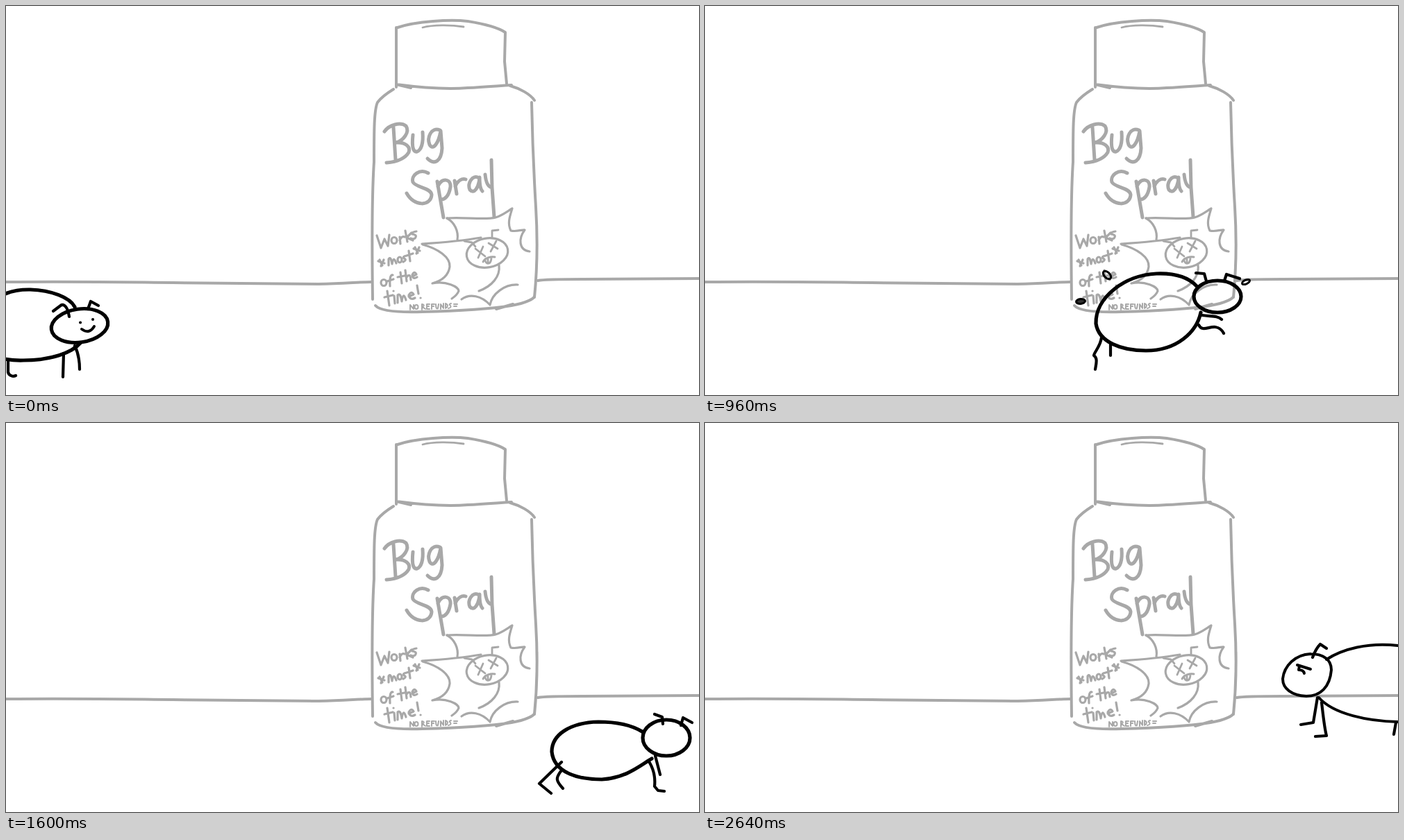
These frames come from a looping animation (998 px wide and 561 px high, 2890 ms). An HTML page:

```html
<!DOCTYPE html>
<html lang="en">
<head>
<meta charset="utf-8">
<title>Bug Spray</title>
<style>
html, body { margin: 0; width: 100%; height: 100%; overflow: hidden; background: #fff; }
svg { display: block; width: 100%; height: 100%; }
path, ellipse { fill: none; stroke-linecap: round; stroke-linejoin: round; }
#scene { stroke: #a8a8a8; stroke-width: 4; }
#bug, #drops { stroke: #000; stroke-width: 4.2; }
#drops { stroke-width: 3; }
.body { stroke-width: 5.2; }
.face, #angry .body { stroke-width: 4; }
.big { stroke-width: 5; }
.mid { stroke-width: 3.2; }
.thin { stroke-width: 2.8; }
.tiny { stroke-width: 2; }
</style>
</head>
<body>
<svg viewBox="0 0 998 561" role="img" aria-label="Bug Spray. Works *most* of the time! No refunds">
  <g id="scene"></g>
  <g id="bug"></g>
  <g id="drops"></g>
</svg>
<script>
const LOOP = 2890;
const $ = id => document.getElementById(id);
const line = (d, cls = '') => `<path class="${cls}" d="${d}"/>`;
const oval = (x, y, rx, ry, turn = 0, cls = '', fill = 'none') =>
  `<ellipse class="${cls}" cx="${x}" cy="${y}" rx="${rx}" ry="${ry}" transform="rotate(${turn} ${x} ${y})" style="fill:${fill}"/>`;

// Backdrop
const ground = line('M0 398C100 397 150 398 240 399S390 401 450 401C490 400 510 398 526 398M766 396C776 394 800 394 830 394L998 393');
const bottle = [
  'M562 31L562 117M564 31C590 22 640 19 665 22C690 26 710 32 719 38L718 80L721 112',
  'M562 113C600 118 640 120 665 118C690 117 710 115 728 114M562 113L583 118',
  'M558 120C545 128 538 135 535 139C530 150 530 180 530 225C527 270 527 350 528 423',
  'M726 115C740 119 755 127 761 136M757 139C758 190 760 240 763 290C766 340 764 390 761 420',
  'M532 432C540 441 570 442 600 441C640 440 690 438 728 432C750 428 760 422 761 419M706 437L730 430'
].map(d => line(d)).join('') + line('M600 31C615 27 640 27 659 30', 'thin');

const title = [
  'M545 181C552 171 568 167 576 173C582 182 572 194 562 197C575 196 583 203 580 211C574 221 560 225 548 226M558 175L561 222',
  'M586 186C584 205 587 211 592 210C599 207 601 195 600 182',
  'M625 179C612 174 606 190 610 200C615 209 623 198 626 180L628 205C627 224 617 230 607 220',
  'M608 241C596 234 583 244 586 254C590 262 612 262 613 272C612 289 588 290 577 270',
  'M621 253L630 305M622 260C628 247 641 249 640 261C638 274 632 279 627 279',
  'M646 252L649 271M647 260C650 252 657 248 662 250',
  'M681 248C672 242 664 256 668 265C674 272 681 262 682 247C682 259 683 264 686 267',
  'M690 243C691 254 694 261 700 262M699 222L700 262L703 304'
].map(d => line(d, 'big')).join('');

const star = (x, y) => `M${x - 5} ${y - 2}l9 3M${x + 3} ${y - 4}l-4 9M${x - 3} ${y - 4}l4 8`;
const slogan = [
  'M534 331L540 349L545 336L550 346L552 330',
  'M567 333L568 343M567 338Q570 331 574 333M575 324L578 340M584 327L577 334L586 338',
  'M591 325Q584 326 585 329Q593 330 589 335Q586 337 583 335',
  star(541, 370), star(592, 352),
  'M551 374L551 365Q554 360 556 372Q558 359 562 371',
  'M577 360Q571 361 573 364Q578 366 572 369M580 353L582 368M577 360L586 357',
  'M557 388Q552 387 553 404M549 397L558 394',
  'M568 384L570 400M564 391L574 389M575 381L577 397M577 391Q582 384 583 395',
  'M585 390L591 387Q588 381 585 388Q586 395 592 391',
  'M549 411L552 432M545 420L557 417M559 418L560 429M558 411h.1',
  'M564 428L564 417Q568 413 570 426Q572 411 576 424',
  'M580 419L587 416Q584 410 580 417Q582 425 589 421M592 403L594 415M597 421h.1'
].map(d => line(d, 'mid')).join('') +
  oval(559, 338, 4, 4.5, 0, 'mid') + oval(567, 366, 3, 4, 0, 'mid') + oval(544, 399, 4, 4.5, 0, 'mid');

const refunds = line('M582 438L582 431L587 437L587 431M599 438V430Q604 431 600 434L604 437M610 430H606V437H610M606 433H609M613 437V430H617M613 433H616', 'tiny') +
  line('M619 430Q619 438 622 436L623 430M626 437V430L630 436V429M633 436V429Q639 432 633 436M641 429Q637 430 640 432Q642 435 637 436M645 430H650M645 433H649', 'tiny') +
  oval(591, 434, 2.5, 3, 0, 'tiny');

const burst = [
  'M635 306C660 304 690 309 705 305C715 302 722 296 729 292C725 305 722 314 727 324C735 326 745 322 747 323C738 335 738 352 754 354',
  'M635 306C646 312 652 325 650 337M599 343C630 341 655 339 684 334',
  'M600 344C622 350 640 362 639 376C637 390 625 397 614 400C634 396 652 405 652 411C650 416 645 420 642 422',
  'M656 423C668 414 685 418 697 431C700 415 718 401 737 402'
].map(d => line(d, 'mid')).join('');
const victim = oval(693, 356, 30, 21, -10, 'mid') +
  line('M676 350L690 361M687 347L680 363M695 342L708 350M706 339L698 354', 'thin') +
  line('M700 334L700 324L709 323M660 339L671 341L676 347', 'thin') +
  line('M687 369C690 363 698 361 704 362M690 365C690 373 698 374 699 364M694 365V369', 'thin') +
  line('M710 374C712 390 700 404 681 411', 'mid');
$('scene').innerHTML = ground + bottle + title + slogan + refunds + burst + victim;

// Bug poses
const body = d => line(d, 'body');
const face = d => line(d, 'face');
const landed = body('M708 441C690 430 665 427 645 427C605 428 578 445 578 470C581 500 615 510 650 510C685 508 705 490 722 480') +
  oval(743, 450, 34, 26, 0, 'body') +
  line('M738 430L737 420L726 416M764 432L767 421L780 428');
const poses = {
  strideA: body('M99 434C92 420 65 410 35 409C-15 408-40 440-40 470C-40 500-10 512 25 511C65 511 95 500 107 486') +
    oval(106, 461, 41, 24, -8, 'body') +
    line('M91 448Q88 430 80 431L68 440M118 437L122 426L133 432') +
    line('M3 511L3 528C4 533 10 535 14 533M83 501L82 535M99 490C104 500 106 510 106 524M-26 500L-34 526L-24 534') +
    face('M109 466Q120 474 127 462M107 456.5h.1M125 452h.1'),
  strideB: body('M321 443C318 425 285 414 255 413C220 412 174 440 174 478C174 505 205 521 240 521C275 521 303 505 316 489') +
    oval(316, 466, 43, 21, -3, 'body') +
    line('M299 451L295 436L285 443M333 441L340 431L351 434') +
    line('M188 496C182 512 172 520 159 524L175 536M203 515C204 530 208 533 215 534M289 513C288 525 280 530 273 539M303 506C308 522 315 536 330 537') +
    face('M318 469Q332 478 340 463M323 459h.1M342 454.5h.1'),
  turn: body('M579 440C570 428 545 420 525 421C490 421 446 445 446 482C447 515 490 529 530 529C565 528 592 512 597 491') +
    body('M543 468C543 452 560 447 585 447C605 448 620 460 621 467C618 480 600 489 580 489C558 488 543 480 543 468') +
    line('M573 437L580 442L591 443L587 454M580 441L586 453') +
    line('M469 507C473 517 481 520 479 530C476 545 470 550 471 556L479 558M498 529L499 544Q504 548 514 548M575 510C585 520 592 530 599 542M597 492C600 508 610 519 622 523') +
    face('M601 460h.1'),
  leap: body('M708 404C695 390 675 385 650 386C605 388 562 420 563 458C567 485 600 497 635 497C680 497 708 470 714 442') +
    oval(738, 419, 34, 23, 0, 'body') +
    line('M722 397L719 386L707 385M748 396L751 387L770 393') +
    line('M571 478C570 490 560 500 560 504C566 508 563 517 562 524M584 488V504M716 446C728 448 738 446 744 452M711 460C716 470 725 462 735 463C742 464 745 468 747 472'),
  land: landed +
    line('M592 485L560 516L577 530M592 497C583 508 584 512 594 523M727 476L734 503M719 486C726 498 727 510 726 520L731 526L740 527'),
  step: landed +
    line('M594 488L584 508L588 527L597 529M606 503L592 520L600 527M731 476L742 504M714 488C712 500 708 512 704 524L714 526'),
  angry: body('M895 341C918 326 955 316 998 321C1050 326 1080 350 1080 376C1080 420 1040 432 998 431C955 430 905 420 884 396') +
    body('M872 333C890 333 902 341 902 356C900 381 886 394 866 394C845 393 832 383 832 369C834 350 850 334 872 333') +
    line('M875 338C878 330 882 323 886 319L895 325M882 396L876 432L858 435M888 403C890 420 892 440 895 451L879 452M995 432L992 449') +
    face('M853 349L872 355M856 350L855 356Q862 356 863 361')
};
$('bug').innerHTML = Object.entries(poses).map(([name, art]) => `<g id="${name}">${art}</g>`).join('');

// [start, pose, dx, dy]
const shots = [
  [0, 'strideA', 0, 0], [120, 'strideA', 79, 1], [160, 'strideB', -105, -2], [280, 'strideA', 184, 4],
  [320, 'strideB', 0, 0], [440, 'strideA', 309, 6], [480, 'strideB', 132, 4], [600, 'strideA', 442, 9],
  [640, 'turn', 0, 0], [760, 'turn', 90, 2], [800, 'land', -8, 20],
  [960, 'leap', 0, 0], [1040, 'leap', 2, -20], [1120, 'leap', 3, -8], [1200, 'leap', 4, 20],
  [1280, 'land', 0, 0], [1400, 'step', 70, -3], [1440, 'land', 98, 0], [1560, 'step', 176, -5],
  [1600, 'land', 208, 4], [1720, 'step', 288, -3], [1760, 'land', 318, 2], [1920, 'step', 418, 0], [1960, '', 0, 0],
  [2160, 'angry', 146, 0], [2240, 'angry', 114, 2], [2320, 'angry', 83, 0], [2400, 'angry', 51, 3],
  [2480, 'angry', 20, 0], [2640, 'angry', 0, 0]
];

// Sweat drops: [x, y, rx, ry, turn] at launch and at rest
const drops = [
  [[579, 388, 7, 4, 45], [471, 350, 10, 4.5, 12], 'none'],
  [[541, 426, 6.5, 3.5, -5], [452, 472, 9.5, 3, -3], '#333'],
  [[779, 398, 6, 2.8, -25], [875, 342, 7.5, 4.5, -42], 'none']
];
const drawDrops = k => drops.map(([from, to, fill]) =>
  oval(...from.map((v, i) => v + (to[i] - v) * k), '', fill)).join('');

let last = null;
function draw(t) {
  const shot = shots.findLast(s => s[0] <= t);
  if (shot === last) return;
  last = shot;
  const [start, pose, dx, dy] = shot;
  for (const name in poses) $(name).style.display = name === pose ? '' : 'none';
  $('bug').setAttribute('transform', `translate(${dx} ${dy})`);
  $('drops').innerHTML = start >= 960 && start <= 1280 ? drawDrops((start - 960) / 320) : '';
}
function tick() {
  draw(performance.now() % LOOP);
  requestAnimationFrame(tick);
}
tick();
</script>
</body>
</html>
```
